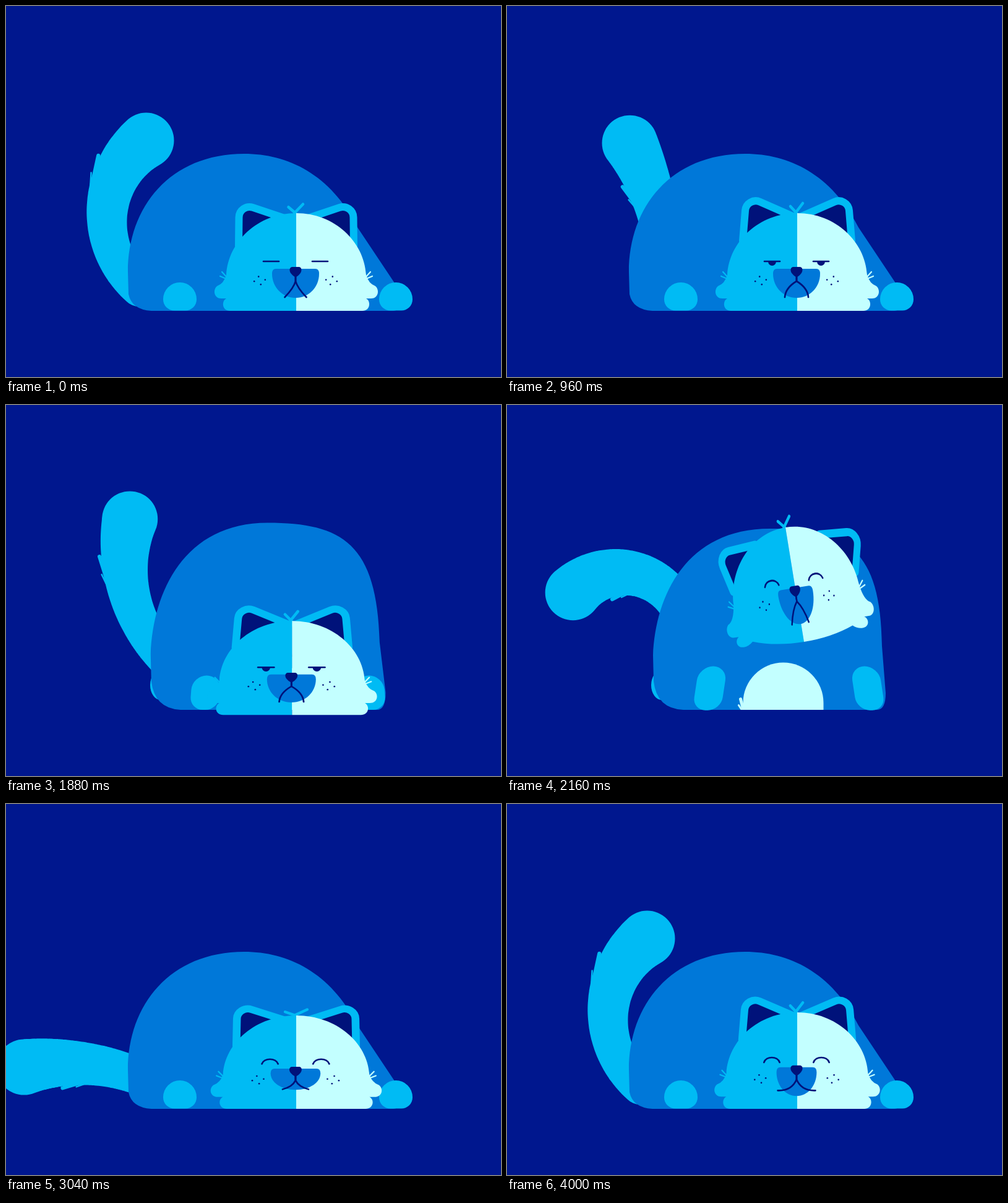
An HTML page with a canvas for the animation above (4.28 s loop, 800 by 600 pixels).

```html
<!DOCTYPE html>
<html lang="en">
<head>
<meta charset="utf-8">
<title>Stretching cat</title>
<style>
html, body { margin: 0; width: 100%; height: 100%; overflow: hidden; background: #00178e; }
canvas { display: block; width: 800px; height: 600px; }
</style>
</head>
<body>
<canvas id="stage" width="800" height="600"></canvas>
<script>
const ctx = document.getElementById('stage').getContext('2d');
const NIGHT = '#00178e', COAT = '#0078d9', CYAN = '#00bbf4', LIGHT = '#c3ffff', INK = '#00127a';
const LOOP = 4280, REST = 4000, STEP = 40, GROUND = 493, RAD = Math.PI / 180;

const ease = {
  both: k => k * k * (3 - 2 * k),
  in: k => k * k,
  out: k => 1 - (1 - k) * (1 - k)
};
const mix = (a, b, k) => a + (b - a) * k;

// A track is a list of [time, pose, easing into the pose].
function sample(track, t) {
  let i = 0;
  while (i < track.length - 1 && track[i + 1][0] <= t) i++;
  const [t0, from] = track[i];
  if (i === track.length - 1) return from;
  const [t1, to, how = 'both'] = track[i + 1];
  const k = ease[how]((t - t0) / (t1 - t0));
  return from.map((v, n) => mix(v, to[n], k));
}

// Body: how far it sits up, vertical stretch, push of the paws.
const lying = [0, 1, 0], flat = [-0.1, 0.97, 0], tall = [1, 1, 1];
const bodyTrack = [
  [0, lying], [1140, lying], [1300, flat], [1520, [0.3, 1.11, 0], 'in'], [1700, [0.75, 1.18, 0], 'out'],
  [1960, [1, 1, 0.3]], [2160, [1, 1, 0.6]], [2380, tall], [2720, tall], [2890, flat, 'in'], [3040, lying]
];

// Head: crown x, crown y, turn in degrees, stretch.
const low = [469, 335, 0, 1], raised = [447, 130, -14.8, 1], squashed = [469, 342, 0, 0.955];
const headTrack = [
  [0, low], [1140, low], [1520, [466, 341, 0, 0.98]], [1960, [462, 350, 0, 0.96]],
  [2160, [450, 198, -9.2, 1.1], 'in'], [2320, [446, 121, -15.5, 1.03], 'out'], [2560, raised],
  [2720, raised], [2900, [469, 350, 0, 0.92], 'in'], [3040, squashed], [3360, squashed],
  [3960, [469, 337, 0, 0.987]]
];

// Face: ears apart, hair apart, lid arch, pupil, muzzle width and height, mouth width, bend, lift.
const asleep = [0.25, 0.25, 0, 0, 38, 47, 17.5, 3, 0];
const grumpy = [0, 0, 0, 1, 38, 47, 19, 18, 0];
const howl = [1.1, 0.1, 8, 0, 31, 54, 15, 10, 0];
const grin = [1, 0, 8, 0, 39, 37, 19, 3, 0];
const snug = [0.22, 1, 8, 0, 38.5, 36, 20, 5, 0];
const smile = [0, 0, 8, 0, 32, 47, 30, 8, 8];
const faceTrack = [
  [0, asleep], [240, asleep], [520, grumpy], [1960, grumpy], [2140, howl], [2380, grin],
  [2740, grin], [2960, snug], [3360, snug], [3900, smile]
];

// Tail, an arc: base x, base y, angle at the base, curl to the tip, length.
const hooked = [215, 457, 221.5, 102.5, 275], curled = [248, 382, 110, 210, 279];
const hanging = [274, 434, 302, -168, 313], upright = [253, 431, 226, 87, 304];
const backward = [259, 462, 210, -42, 238];
const tailTrack = [
  [0, hooked], [720, [255, 455, 203, 30, 235]], [980, [254, 450, 273, -32, 238]], [1520, curled],
  [1600, curled], [1880, [262, 415, 225, 60, 250]], [2160, hanging], [2460, upright],
  [2700, upright], [2960, backward], [3080, backward], [3420, [215, 457, 219, 100, 275]], [REST, hooked]
];

function fill(color, path) {
  ctx.beginPath();
  path();
  ctx.fillStyle = color;
  ctx.fill();
}

function line(color, width, path) {
  ctx.beginPath();
  path();
  ctx.strokeStyle = color;
  ctx.lineWidth = width;
  ctx.stroke();
}

function hair(color, width, x1, y1, x2, y2) {
  line(color, width, () => { ctx.moveTo(x1, y1); ctx.lineTo(x2, y2); });
}

function drawTail(t) {
  const n = 150, [bx, by, angle, curl, length] = sample(tailTrack, t);
  const pts = [];
  for (let i = 0, x = bx, y = by; i <= n; i++) {
    const a = (angle + curl * (i + 0.5) / n) * RAD;
    pts.push({ x, y, a, r: 29 + 16 * (i / n) ** 2 });
    x += Math.cos(a) * length / n;
    y += Math.sin(a) * length / n;
  }
  fill(CYAN, () => pts.forEach(({ x, y, r }) => {
    ctx.moveTo(x + r, y);
    ctx.arc(x, y, r, 0, 7);
  }));
  const edge = (fromTip, out) => {
    const { x, y, a, r } = pts[Math.round(n * (1 - fromTip / length))];
    return [x + Math.sin(a) * (r + out), y - Math.cos(a) * (r + out)];
  };
  hair(CYAN, 6, ...edge(92, -3), ...edge(62, 3));
  hair(CYAN, 2.5, ...edge(100, -1), ...edge(87, 3));
}

function drawBody([s, stretch]) {
  const left = mix(197, 236, s), apex = mix(385, 425, s), top = mix(239, 200, s);
  const hip = mix(568, 606, s), foot = mix(640, 612, s);
  fill(CYAN, () => ctx.ellipse(250, 453, 17, 24, 0, 0, 7));
  ctx.save();
  ctx.translate(0, GROUND * (1 - stretch));
  ctx.scale(1, stretch);
  fill(COAT, () => {
    ctx.moveTo(left + mix(38, 49, s), GROUND);
    ctx.quadraticCurveTo(left + 6, GROUND - 2, left + 1, mix(466, 447, s));
    ctx.lineTo(left, mix(430, 405, s));
    ctx.bezierCurveTo(left + 4 * s, mix(325, 308, s), left + mix(68, 54, s), top, apex, top);
    ctx.bezierCurveTo(apex + mix(70, 125, s), top, hip - mix(43, 2, s), top + 33, hip, mix(358, 390, s));
    ctx.lineTo(foot, 466);
    ctx.quadraticCurveTo(foot, GROUND, foot - 14, GROUND);
  });
  ctx.restore();
}

function drawPaws([s, , push]) {
  const w = mix(54, 46, s), lean = 18 * push;
  const base = GROUND - 0.5 + 2 * push, h = base - 447 + 41 * push;
  const rt = w / 2, rb = mix(18, 21, s);
  for (const side of [-1, 1]) {
    ctx.save();
    ctx.transform(1, 0, side * lean / h, 1, 455.5 + side * mix(174.5, 133, s), base);
    fill(CYAN, () => ctx.roundRect(-w / 2, -h, w, h, [rt, rt, rb, rb]));
    ctx.restore();
  }
}

function drawBelly([, , push]) {
  const x = 446.5, r = 65, top = 428 - 19 * push;
  ctx.save();
  ctx.beginPath();
  ctx.rect(0, 0, 800, GROUND);
  ctx.clip();
  fill(LIGHT, () => {
    ctx.arc(x, top + r, r, Math.PI, 0);
    ctx.lineTo(x + r, GROUND);
    ctx.lineTo(x - r, GROUND);
  });
  hair(LIGHT, 5, x - 69, top + 59, x - 65, GROUND - 2);
  hair(LIGHT, 3, x - 72, top + 69, x - 67, GROUND);
  ctx.restore();
}

function drawEar(side, apart) {
  const path = () => {
    const rootX = side * mix(5, 53, apart), rootY = mix(6, 17, apart);
    ctx.moveTo(side * mix(88, 108, apart), mix(45, 78, apart));
    ctx.arcTo(side * mix(82, 123, apart), mix(-28, 18, apart), rootX, rootY, 17);
    ctx.lineTo(rootX, rootY);
  };
  fill(INK, () => { path(); ctx.lineTo(0, 60); });
  line(CYAN, 12, path);
}

function drawHalf(side, color, chin, droop) {
  const cheek = 118 + droop, jaw = 158 + droop * 0.6;
  ctx.save();
  ctx.scale(side, 1);
  for (const i of [0, 1]) hair(color, 2.2, 120 + 3 * i, 95 + 7 * i, 111, 105 + 2 * i);
  fill(color, () => {
    ctx.moveTo(0, 0);
    ctx.bezierCurveTo(62, 0, 110, 46, 113, 100);
    ctx.quadraticCurveTo(117, cheek - 4, 128, cheek);
    ctx.bezierCurveTo(135, cheek + 6, 133, cheek + 20, 121, cheek + 20);
    ctx.lineTo(113, cheek + 20);
    ctx.bezierCurveTo(121, cheek + 24, 120, jaw, 107, jaw);
    ctx.quadraticCurveTo(98, jaw, 90, 158);
    ctx.quadraticCurveTo(50, 158 + chin, 0, 158 + chin);
  });
  ctx.restore();
}

function drawEye(x, arch, pupil) {
  const end = 78 + arch / 2, bend = 78 - arch * 0.833;
  line(INK, 2.7, () => {
    ctx.moveTo(x - 12.5, end);
    ctx.bezierCurveTo(x - 9, bend, x + 9, bend, x + 12.5, end);
  });
  if (pupil > 0) fill(INK, () => ctx.ellipse(x, 78, 6.5, 7 * pupil, 0, 0, Math.PI));
}

function drawMuzzle(w, h, mouthW, bend, lift) {
  const top = 90, bottom = top + h, mid = mix(top + 8, bottom, 0.55);
  fill(COAT, () => {
    ctx.moveTo(6 - w, top);
    ctx.lineTo(w - 6, top);
    ctx.quadraticCurveTo(w, top, w, top + 8);
    ctx.bezierCurveTo(w, mid, w * 0.57, bottom, 0, bottom);
    ctx.bezierCurveTo(-w * 0.57, bottom, -w, mid, -w, top + 8);
    ctx.quadraticCurveTo(-w, top, 6 - w, top);
  });
  for (const side of [-1, 1]) {
    line(INK, 2.7, () => {
      ctx.moveTo(0, 100);
      ctx.lineTo(0, 110);
      ctx.quadraticCurveTo(side * bend, 121 + lift, side * mouthW, bottom - 1 - lift);
    });
  }
  fill(INK, () => {
    ctx.moveTo(-6, 87);
    ctx.lineTo(6, 87);
    ctx.bezierCurveTo(11, 88, 10, 95, 7, 98);
    ctx.quadraticCurveTo(3, 103, 0, 103);
    ctx.quadraticCurveTo(-3, 103, -7, 98);
    ctx.bezierCurveTo(-10, 95, -11, 88, -6, 87);
  });
}

function drawFreckles(side) {
  for (let i = 0; i < 4; i++) {
    const a = side * 0.2 + i * Math.PI / 2;
    fill(INK, () => ctx.arc(side * 58 + 9 * Math.cos(a), 109 + 6.5 * Math.sin(a), 1.3, 0, 7));
  }
}

function drawHead(t) {
  const [x, y, turn, stretch] = sample(headTrack, t);
  const [ears, tuft, arch, pupil, ...muzzle] = sample(faceTrack, t);
  const chin = -turn * 1.35, droop = Math.max(0, stretch - 1) * 100;
  ctx.save();
  ctx.translate(x, y);
  ctx.rotate(turn * RAD);
  ctx.scale(1 / stretch, stretch);
  drawEar(-1, ears);
  drawEar(1, ears);
  hair(CYAN, 4.5, -11 - 6 * tuft, -11 + 5 * tuft, -1, 0);
  hair(CYAN, 4.5, 9 + 8 * tuft, -16 + 6 * tuft, -3, 0);
  drawHalf(-1, CYAN, chin, droop);
  drawHalf(1, LIGHT, chin, droop);
  ctx.translate(-1, 0);
  drawMuzzle(...muzzle);
  for (const side of [-1, 1]) {
    drawEye(side * 39.5, arch, pupil);
    drawFreckles(side);
  }
  ctx.restore();
}

function draw(now) {
  const t = Math.min(REST, Math.floor((now - start) % LOOP / STEP) * STEP);
  const body = sample(bodyTrack, t);
  ctx.lineCap = ctx.lineJoin = 'round';
  ctx.fillStyle = NIGHT;
  ctx.fillRect(0, 0, 800, 600);
  drawTail(t);
  drawBody(body);
  drawPaws(body);
  drawBelly(body);
  drawHead(t);
}

function tick() {
  draw(performance.now());
  requestAnimationFrame(tick);
}

const start = performance.now();
tick();
</script>
</body>
</html>
```
